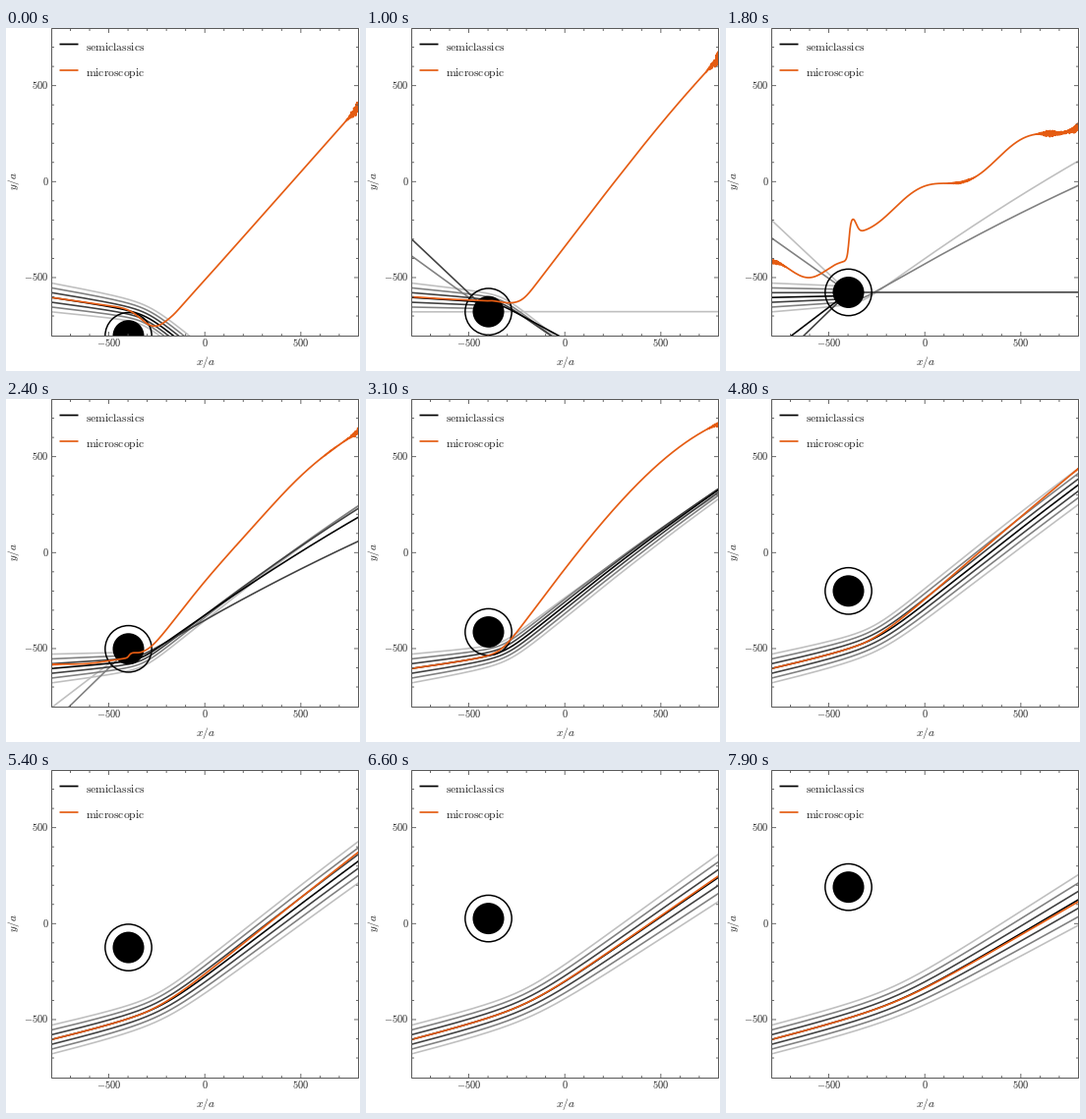
These frames come from a looping animation (360 by 349 pixels, 8 s). A matplotlib script:

```python
import numpy as np
import matplotlib.pyplot as plt
from matplotlib.animation import FuncAnimation
from matplotlib.patches import Circle, Rectangle

plt.rcParams["mathtext.fontset"] = "cm"

W, H, DPI = 360, 349, 100
FRAMES, STEP = 80, 100
PT = 72 / DPI
L, R, T, B = 46.5, 358.5, 0.5, 313.5
X0, Y0, UNIT = 202.2, 156.3, 0.1953
HOLE_X, HORIZON, MID_Y, SPREAD = 124.5, 16, 274.2, 4.88
ORANGE, FRAME = "#e55c12", "#5a5a5a"

xs = np.arange(L, R + 0.2, 0.4)


def hole_y(n):
    return 313.2 - 2.456 * n


def launch_slope(gap):
    """Start slope of a horizontal ray dragged by the inflow sqrt(rs / r)."""
    dx = HOLE_X - L
    r = np.hypot(dx, gap)
    flow = np.sqrt(HORIZON / r)
    return 1.04 * flow * gap / (r + flow * dx)


def sweep(slope, rise, xc, w, sag, power):
    """Height gained along a line that turns softly at xc and then flattens."""
    dx = xs - xc
    h = (dx + np.hypot(dx, w)) / 2
    h = h - h[0]
    h = h * (1 - sag * h ** power)
    return slope * (xs - L) + (rise - slope * (R - L)) * h / h[-1]


def deflection(gap):
    """Height gained by a ray whose start lies gap pixels below the hole."""
    far = max(gap - 60, 0)
    rise = 193 - 15500 / gap ** 2 - 0.97 * far ** 2 / (far + 80)
    sag = 0.0006 * np.exp(-(gap / 110) ** 2)
    return sweep(launch_slope(gap), rise, 132 + 0.27 * gap, 6 + 0.32 * gap, sag, 1)


def ray(i, n):
    start, yc = MID_Y - SPREAD * (i - 3), hole_y(n)
    gap = start - yc
    if abs(gap) >= 12:
        return xs, start - np.sign(gap) * deflection(abs(gap))
    # Rays that fall in are flung out again, unless they hit the centre
    turn = (210 + 1.4 * abs(gap)) * (1 - np.exp(-(gap / 3) ** 4))
    a = np.radians(np.sign(gap) * turn)
    return ([L, HOLE_X - 10, HOLE_X, HOLE_X + 500 * np.cos(a)],
            [start, start - 0.3 * gap, yc, yc - 500 * np.sin(a)])


def bell(x, c, w):
    return np.exp(-((x - c) / w) ** 2)


def near_path(n):
    """Strongly deflected wave packet while the hole is close."""
    t = min(n / 31, 1)
    dip = 15 * np.exp(-n / 6) * bell(xs, 150, 18)
    rise = 249 - 55 * np.exp(-n / 4)
    slope = launch_slope(MID_Y - hole_y(n))
    return MID_Y + dip - sweep(slope, rise, 171 - 34 * t, 8 + 4 * t, 5.2e-6 * t, 2)


def storm_path():
    """Scattered packet while it hits the hole head-on."""
    left = 246 - 8 * np.cos(2 * np.pi * (xs - L) / 75)
    right = 206 - 0.483 * (xs - HOLE_X) + 8 * np.cos(2 * np.pi * (xs - 145) / 105)
    jump = 1 / (1 + np.exp(-(xs - 125) / 0.8))
    return left + (right - left) * jump - 14 * bell(xs, 129, 5)


def far_path(n):
    drift = 4 - 72 * np.exp(-(n - 31) / 13.5)
    gap = max(MID_Y - hole_y(n), 12)
    return MID_Y - deflection(gap) + drift * np.clip((xs - 140) / 218, 0, 1)


def packet(n):
    storm = bell(n, 18, 4)
    far = np.clip((n - 31) / 10, 0, 1)
    y = (1 - far) * near_path(n) + far * far_path(n)
    y = (1 - storm) * y + storm * storm_path()
    amp = 10 * bell(n, 0, 27) * np.clip((xs - 343) / 15, 0, 1) ** 2
    amp += storm * (2.5 * bell(xs, L, 10) + 1.2 * bell(xs, 240, 10)
                    + 3.5 * bell(xs, 329, 8) + 1.5 * bell(xs, 345, 10))
    jitter = np.random.default_rng(n).uniform(0.3, 1, len(xs))
    jitter[::2] *= -1
    return y + amp * jitter


fig = plt.figure(figsize=(W / DPI, H / DPI), dpi=DPI, facecolor="white")
ax = fig.add_axes([0, 0, 1, 1])
ax.set_xlim(0, W)
ax.set_ylim(H, 0)
ax.axis("off")

box = Rectangle((L, T), R - L, B - T, fill=False, ec=FRAME, lw=PT,
                snap=False, zorder=9)
ax.add_patch(box)


def line(x, y, color, width, z):
    return ax.plot(x, y, color=color, lw=width * PT, zorder=z, snap=False,
                   solid_capstyle="butt", solid_joinstyle="round")[0]


def label(x, y, s, px, **kw):
    kw = {"ha": "center", "va": "baseline", **kw}
    ax.text(x, y, s, fontsize=px * PT, color="#222222", zorder=10, **kw)


for k in range(-7, 9):
    size = 4.5 if k % 5 == 0 else 2.5
    px, py = X0 + 100 * k * UNIT, Y0 - 100 * k * UNIT
    for edge, d in ((B, -size), (T, size)):
        line([px, px], [edge, edge + d], FRAME, 0.9, 9)
    for edge, d in ((L, size), (R, -size)):
        line([edge, edge + d], [py, py], FRAME, 0.9, 9)
    if k % 5 == 0:
        label(px, 323.5, f"${100 * k}$", 10.4)
        label(43.5, py + 3.4, f"${100 * k}$", 10.4, ha="right")

label(203, 343, "$x/a$", 11.3)
label(8.5, 156, "$y/a$", 11.3, rotation=90, va="center")
for y, color, name in ((16.5, "black", "semiclassics"), (43, ORANGE, "microscopic")):
    line([54.5, 73.5], [y, y], color, 1.7, 10)
    label(81, y + 6.3, rf"$\mathrm{{{name}}}$", 11.6, ha="left")

rays = [line([], [], str(abs(i - 3) * 0.25), 1.6, 5 - abs(i - 3)) for i in range(7)]
wave = line([], [], ORANGE, 1.7, 8)
disc = Circle((HOLE_X, 0), HORIZON, fc="black", ec="none", zorder=6)
ring = Circle((HOLE_X, 0), 1.48 * HORIZON, fill=False, ec="black",
              lw=1.5 * PT, zorder=6)
ax.add_patch(disc)
ax.add_patch(ring)
for art in (*rays, wave, disc, ring):
    art.set_clip_path(box)


def update(n):
    for i, art in enumerate(rays):
        art.set_data(*ray(i, n))
    wave.set_data(xs, packet(n))
    for c in (disc, ring):
        c.center = (HOLE_X, hole_y(n))
    return [*rays, wave, disc, ring]


anim = FuncAnimation(fig, update, frames=FRAMES, interval=STEP, repeat=True,
                     repeat_delay=0, blit=False)
plt.show()
```
